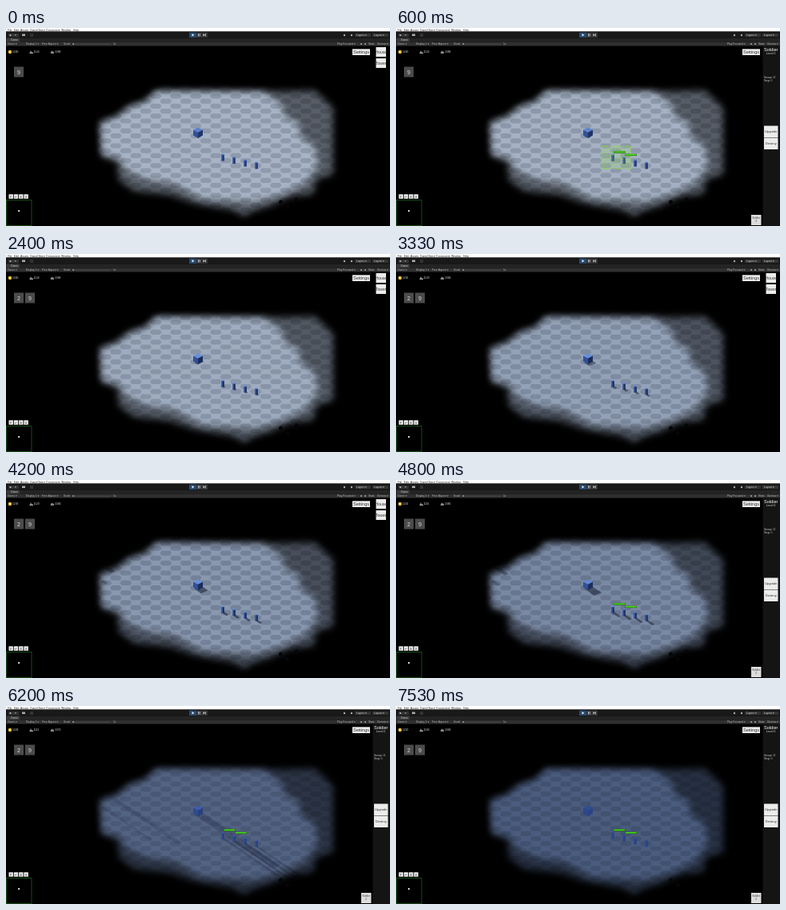
Animation, 480 px wide and 248 px high, one loop 8.07 s. Source, as an HTML page with a canvas:

```html
<!DOCTYPE html>
<html lang="en">
<head>
<meta charset="utf-8">
<style>
html, body { margin: 0; width: 100%; height: 100%; overflow: hidden; background: #000; }
canvas { display: block; width: 480px; height: 248px; }
</style>
</head>
<body>
<canvas id="stage" width="480" height="248"></canvas>
<script>
const W = 480, H = 248, LOOP = 8070, LAST = 7530;
const ctx = document.getElementById('stage').getContext('2d');

// Daylight keys: time, light tile, dark tile, shadow length, shadow opacity, face contrast
const DAY = [
  [0, [168, 180, 197], [143, 155, 172], 1, .2, .75],
  [2400, [159, 172, 191], [136, 149, 168], 4, .4, 1],
  [4200, [138, 152, 175], [116, 130, 153], 10, .55, 1],
  [4800, [122, 137, 163], [104, 118, 144], 15, .5, .9],
  [5500, [101, 117, 147], [87, 102, 131], 38, .4, .6],
  [6200, [83, 99, 130], [73, 88, 117], 120, .22, .3],
  [6900, [77, 94, 127], [67, 83, 114], 170, 0, .12],
  [7530, [75, 92, 126], [65, 82, 113], 170, 0, .1]
];
const SOLDIERS = [[271, 162], [285, 165.5], [299, 169], [313, 172]];
const OUTER = [[188, 79], [345, 79], [386, 78], [409, 100], [409, 183], [388, 190], [384, 208],
  [355, 211], [330, 223], [309, 229], [298, 236], [283, 228], [237, 220], [205, 209], [160, 204],
  [141, 190], [139, 168], [120, 161], [117, 118], [138, 110], [154, 97], [172, 92]];
const BRIGHT = [[188, 79], [322, 80], [344, 95], [350, 112], [366, 118], [368, 136], [386, 148],
  [390, 172], [374, 194], [347, 208], [310, 218], [245, 214], [210, 195], [176, 190], [150, 178],
  [141, 162], [120, 158], [119, 119], [140, 112], [156, 99], [175, 93]];

const mix = (a, b, k) => Array.isArray(a) ? a.map((v, i) => mix(v, b[i], k)) : a + (b - a) * k;
const rgb = c => `rgb(${c.map(Math.round)})`;

function layer() {
  const c = document.createElement('canvas');
  c.width = W;
  c.height = H;
  return c.getContext('2d');
}

function poly(g, points, fill) {
  g.beginPath();
  points.forEach(([x, y]) => g.lineTo(x, y));
  g.closePath();
  g.fillStyle = fill;
  g.fill();
}

function rect(x, y, w, h, fill) {
  ctx.fillStyle = fill;
  ctx.fillRect(x, y, w, h);
}

function dot(x, y, r, fill) {
  ctx.fillStyle = fill;
  ctx.beginPath();
  ctx.arc(x, y, r, 0, 7);
  ctx.fill();
}

function text(str, x, y, size, fill, align = 'left', weight = 400) {
  ctx.font = `${weight} ${size}px "Liberation Sans", sans-serif`;
  ctx.textAlign = align;
  ctx.fillStyle = fill;
  ctx.fillText(str, x, y);
}

function button(label, x, y, w, h, size) {
  rect(x, y, w, h, '#ececec');
  text(label, x + w / 2, y + h / 2 + size * .35, size, '#333', 'center');
}

const fog = layer();
fog.filter = 'blur(4px)';
poly(fog, OUTER, 'rgba(0,0,0,.52)');
poly(fog, BRIGHT, '#000');

const checks = layer();
for (let row = 0; row < 28; row++) {
  for (let col = 0; col < 13; col++) {
    const x = 106 + col * 25 + (row % 2) * 12.5, y = 70 + row * 6.2;
    poly(checks, [[x - 1, y + 3.1], [x + 1, y], [x + 11.5, y], [x + 13.5, y + 3.1], [x + 11.5, y + 6.2], [x + 1, y + 6.2]], '#000');
  }
}
checks.globalCompositeOperation = 'source-in';

const ground = layer();

function daylight(t) {
  let i = 0;
  while (i < DAY.length - 2 && t > DAY[i + 1][0]) i++;
  const a = DAY[i], b = DAY[i + 1], k = Math.min(1, (t - a[0]) / (b[0] - a[0]));
  return mix(a.slice(1), b.slice(1), k);
}

function castShadow(x, y, width, length, alpha) {
  const dx = length * .82, dy = length * .56, n = width / 2;
  poly(ground, [[x - n, y + n * .4], [x + n, y - n * .4], [x + n + dx, y - n * .4 + dy], [x - n + dx, y + n * .4 + dy]],
    `rgba(18,26,48,${alpha})`);
}

function drawGround([light, dark, length, alpha]) {
  ground.globalCompositeOperation = 'source-over';
  ground.fillStyle = rgb(light);
  ground.fillRect(0, 0, W, H);
  checks.fillStyle = rgb(dark);
  checks.fillRect(0, 0, W, H);
  ground.drawImage(checks.canvas, 0, 0);
  castShadow(240, 134.5, 9, length, alpha);
  SOLDIERS.forEach(([x, y]) => castShadow(x, y + 3.5, 3, length * .7, alpha));
  if (length > 10) {
    castShadow(126, 110, 5, Math.min(length, 110), alpha * .75);
    castShadow(120, 126, 4, Math.min(length * .7, 75), alpha * .5);
  }
  ground.globalCompositeOperation = 'destination-in';
  ground.drawImage(fog.canvas, 0, 0);
  ctx.drawImage(ground.canvas, 0, 0);
}

function drawUnits(contrast, t) {
  const base = mix([50, 84, 166], [44, 70, 138], t / LAST);
  const top = rgb(mix(base, [104, 143, 218], contrast));
  const left = rgb(mix(base, [48, 80, 154], contrast));
  const right = rgb(mix(base, [27, 43, 88], contrast));
  poly(ctx, [[234, 127.5], [240, 130.5], [240, 138], [234, 134.5]], left);
  poly(ctx, [[246, 127.5], [240, 130.5], [240, 138], [246, 134.5]], right);
  poly(ctx, [[234, 127.5], [240, 124.7], [246, 127.5], [240, 130.5]], top);
  for (const [x, y] of SOLDIERS) {
    rect(x - 1.8, y - 3.5, 1.9, 8, left);
    rect(x, y - 3.5, 1.8, 8, right);
    rect(x - 1.8, y - 4.3, 3.6, 1.5, top);
  }
  [[343.5, 218], [363, 215], [352, 224.5]].forEach(([x, y]) => dot(x, y, 2.5, '#050607'));
}

function drawSelection(t) {
  if (t < 200 || t >= 680) return;
  const k = Math.min(1, (t - 200) / 300);
  const w = 36 * k, h = 28 * k;
  rect(257, 148, w, h, 'rgba(150,230,80,.16)');
  ctx.strokeStyle = '#8fe22c';
  ctx.lineWidth = 1;
  ctx.setLineDash([1.5, 1.5]);
  ctx.strokeRect(257, 148, w, h);
  ctx.globalAlpha = .45;
  ctx.beginPath();
  for (let y = 152; y < 148 + h; y += 4) {
    ctx.moveTo(257 + y % 3, y);
    ctx.lineTo(257 + w, y);
  }
  ctx.stroke();
  ctx.globalAlpha = 1;
  ctx.setLineDash([]);
}

function drawEditor() {
  rect(0, 0, W, 4.5, '#fff');
  [['File', 2], ['Edit', 10], ['Assets', 18], ['GameObject', 30], ['Component', 50], ['Window', 69], ['Help', 84]]
    .forEach(([s, x]) => text(s, x, 3.6, 3.4, '#222'));
  rect(0, 4.5, W, 8, '#191919');
  rect(3, 7, 13, 4, '#333');
  text('▾', 11, 10.3, 3.5, '#bbb');
  dot(5.5, 9, 1.1, '#bbb');
  rect(20, 7.5, 4, 2.5, '#aaa');
  rect(30, 7, 4, 4, '#333');
  rect(229, 5.5, 9, 6.5, '#29496b');
  poly(ctx, [[232.5, 7], [235.5, 8.8], [232.5, 10.5]], '#ddecff');
  rect(238, 5.5, 14, 6.5, '#333');
  rect(240, 7, .9, 3.5, '#ccc');
  rect(241.7, 7, .9, 3.5, '#ccc');
  poly(ctx, [[246.5, 7], [249, 8.8], [246.5, 10.5]], '#ccc');
  rect(249, 7, .8, 3.5, '#ccc');
  dot(423, 9, 1.2, '#aaa');
  dot(432, 9, 1.2, '#aaa');
  rect(436, 7, 20, 4, '#333');
  rect(458, 7, 20, 4, '#333');
  text('Layers ▾', 438, 10.3, 3.4, '#ccc');
  text('Layout ▾', 460, 10.3, 3.4, '#ccc');
  rect(0, 12.5, W, 5, '#242424');
  rect(1, 12.5, 16, 5, '#3a3a3a');
  text('Game', 6, 16.3, 3.4, '#ccc');
  rect(0, 17.5, W, 5, '#303030');
  [['Game ▾', 2], ['Display 1 ▾', 25], ['Free Aspect ▾', 45], ['Scale', 72], ['1x', 134], ['Play Focused ▾', 414], ['Stats', 453], ['Gizmos ▾', 464]]
    .forEach(([s, x]) => text(s, x, 21.2, 3.3, '#bbb'));
  rect(84, 19.8, 47, .5, '#666');
  dot(84, 20, .9, '#aaa');
  dot(444, 20, 1, '#aaa');
  dot(449, 20, 1, '#aaa');
}

function drawResources(t) {
  const spent = [3000, 4350, 6000, 6900, 7300].filter(s => t >= s).length;
  dot(5, 30, 2.2, '#f0c12e');
  dot(4.6, 29.5, 1, '#ffe27a');
  poly(ctx, [[29, 32], [31, 28], [33.5, 32]], '#77746c');
  rect(30, 30.7, 4, 1.3, '#aaa');
  poly(ctx, [[55.5, 31], [57, 28.5], [60, 30], [60, 32], [56, 32]], '#858585');
  [[1240, 8], [1124, 34.5], [1088, 61]].forEach(([n, x]) => text(n - spent * 4, x, 31.3, 3.3, '#ddd'));
}

function drawGroups(t) {
  const groups = t >= 1270 ? ['2', '9'] : ['9'];
  groups.forEach((name, i) => {
    const x = 10 + i * 14;
    rect(x, 48.5, 12, 13, '#4b4b4b');
    text(name, x + 6, 57.5, 7, '#ddd', 'center');
  });
}

function drawMinimap() {
  ['F', '↵', 'E', 'X'].forEach((key, i) => {
    rect(3.5 + i * 6.3, 208.3, 5.4, 5.5, '#eee');
    text(key, 6.2 + i * 6.3, 212.5, 4, '#222', 'center');
  });
  ctx.strokeStyle = '#164b18';
  ctx.lineWidth = 1;
  ctx.strokeRect(.5, 215.5, 31.5, 32);
  rect(15, 228, 2.2, 2.2, '#bdc6d2');
}

function drawPanel(selected) {
  button('Settings', 433, 26.3, 22, 7.7, 5.6);
  if (!selected) {
    button('House', 462.5, 24, 12.5, 12, 5);
    button('Tower', 462.5, 38, 12.5, 12, 5);
    return;
  }
  rect(458.5, 22.5, 21.5, H, '#141414');
  text('Soldier', 468.7, 28.6, 5.6, '#fff', 'center');
  text('Level 1', 468.7, 33.3, 3.7, '#ddd', 'center');
  text('Damage: 10', 460, 62.5, 2.6, '#ccc');
  text('Range: 3', 460, 66.5, 2.6, '#ccc');
  button('Upgrade', 460, 122.5, 17.5, 15, 4.1);
  button('Destroy', 460, 138, 17.5, 14, 4.1);
  rect(444, 234, 12.5, 13, '#ddd');
  text('Soldier', 450.2, 238.5, 3.2, '#333', 'center');
  text(selected === 1 ? '1' : '2', 450.2, 243, 3.2, '#333', 'center');
  for (const [x, y] of [[272, 154.3], [286.5, 157.7]]) {
    rect(x, y, 14.5, 2.4, '#17470d');
    rect(x + .3, y + .2, 13.7, 1.7, '#45dc16');
  }
}

function render(now) {
  const t = Math.min(now % LOOP, LAST);
  const day = daylight(t);
  const selected = (t >= 530 && t < 2200) || t >= 4470;
  rect(0, 0, W, H, '#000');
  drawGround(day);
  drawUnits(day[4], t);
  drawSelection(t);
  drawEditor();
  drawResources(t);
  drawGroups(t);
  drawMinimap();
  drawPanel(selected);
}

const start = performance.now();
function tick() {
  render(performance.now() - start);
  requestAnimationFrame(tick);
}
tick();
</script>
</body>
</html>
```
